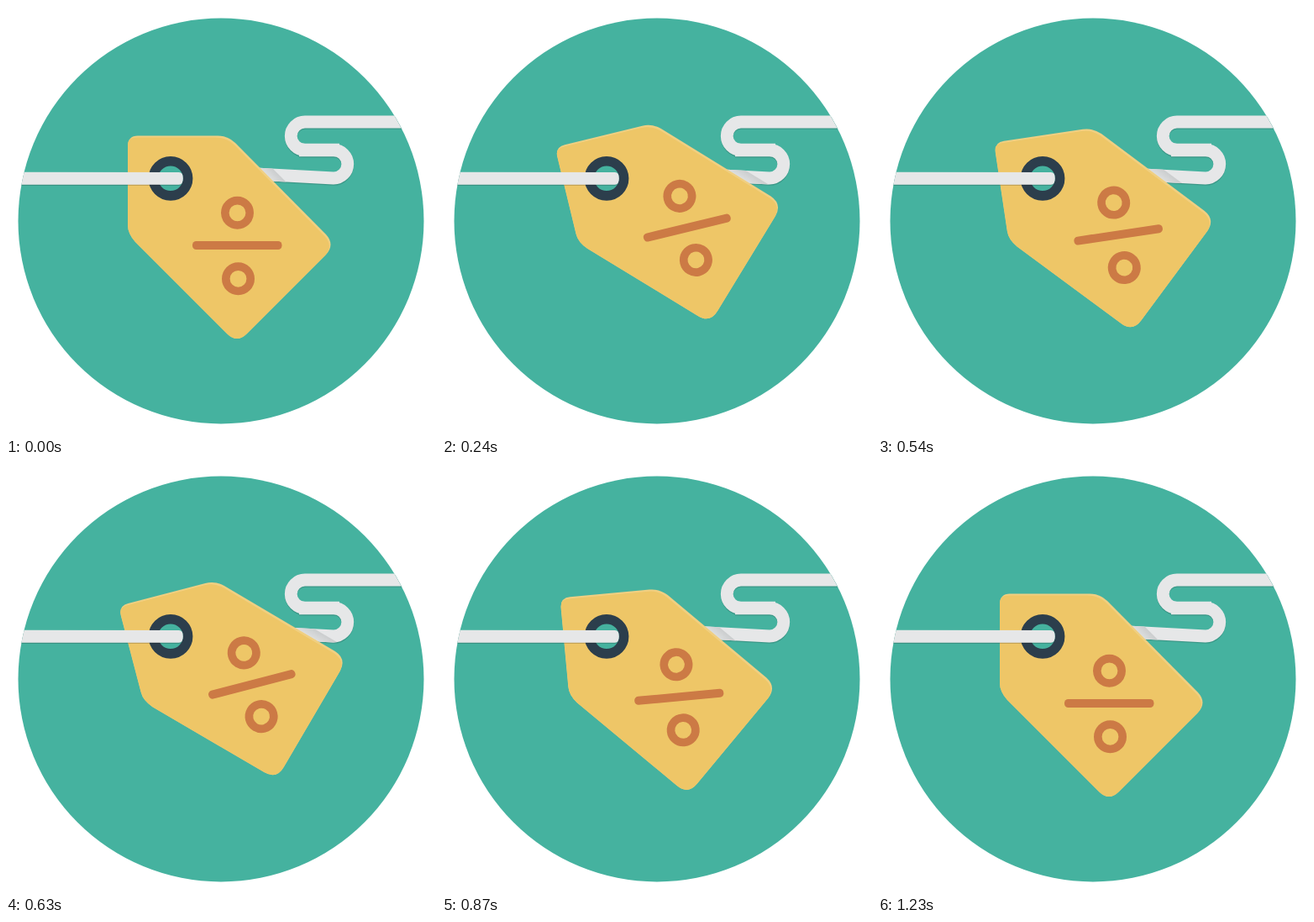
Write an HTML page that moves like this. It is 512 by 512 pixels and loops after 2.23 s.

```html
<!DOCTYPE html>
<html lang="en">
<head>
<meta charset="utf-8">
<title>Swinging price tag</title>
<style>
  html, body { margin: 0; width: 100%; height: 100%; overflow: hidden; background: #fff; }
  svg { display: block; width: 100%; height: 100%; }
</style>
</head>
<body>
<svg viewBox="0 0 512 512">
  <defs>
    <clipPath id="disc"><circle cx="256" cy="256" r="241.5"/></clipPath>
    <g id="cord" fill="none">
      <path stroke-width="14.8" d="M480 138H356a16.75 16.75 0 0 0 0 33.5H390a16.75 16.75 0 0 1 0 33.5L260 198"/>
      <path stroke-width="15.4" d="M349 171.5H397"/>
    </g>
    <mask id="onCord" maskUnits="userSpaceOnUse" x="0" y="0" width="512" height="512">
      <use href="#cord" stroke="#fff"/>
    </mask>
    <path id="tag" d="M145 167Q145 154.500 157 154.500H252Q264 154.500 273 163L381 272Q392 284 381 296L287 390Q275 402 263 390L154 281Q145 271 145 261Z"/>
    <clipPath id="inTag"><use href="#tag"/></clipPath>
    <linearGradient id="shade" gradientUnits="userSpaceOnUse" x1="303" y1="194" x2="310.500" y2="186.500">
      <stop offset="0" stop-color="#dcdedf"/>
      <stop offset="1" stop-color="#cbcdce"/>
    </linearGradient>
  </defs>

  <circle cx="256" cy="256" r="241.5" fill="#45b29f"/>
  <g clip-path="url(#disc)">
    <use href="#cord" stroke="#3b9888" y="1.3"/>
    <use href="#cord" stroke="#e6e7e8"/>
  </g>
  <g mask="url(#onCord)">
    <path class="swing" fill="url(#shade)" d="M263 154L278 154L396 272L381 272Z"/>
  </g>

  <g class="swing">
    <use href="#tag" fill="#f0cf81"/>
    <g clip-path="url(#inTag)"><use href="#tag" x="-1.6" y="2" fill="#eec667"/></g>
    <g fill="none" stroke="#cc7a45" stroke-width="9.6">
      <circle cx="275.5" cy="246.300" r="14.7"/>
      <circle cx="276.5" cy="324.800" r="14.7"/>
    </g>
    <rect x="222" y="280" width="106.500" height="10" rx="4.500" fill="#cc7a45"/>
  </g>

  <circle cx="196" cy="205.300" r="20.600" fill="#45b29f" stroke="#2c3e4c" stroke-width="11.600"/>
  <g clip-path="url(#disc)">
    <path fill="#000" fill-opacity=".18" d="M0 199H206Q210.500 199 210.500 206T206 214H0Z"/>
    <path fill="#e6e7e8" d="M0 197.700L206 198Q210.800 198 210.800 205.300T206 212.700H0Z"/>
  </g>
</svg>
<script>
const LOOP = 2230, STEP = 30, SWING = 1210;
// [share of the swing, angle in degrees]
const keys = [[0, 0], [.15, -15], [.45, -8.5], [.55, -15], [1, 0]];
const parts = document.querySelectorAll('.swing');

// cubic-bezier(.25, .1, .25, 1), solved by bisection
function ease(x) {
  let lo = 0, hi = 1, s = .5;
  for (let i = 0; i < 24; i++) {
    s = (lo + hi) / 2;
    if (.75 * s * (1 - s) + s ** 3 < x) lo = s; else hi = s;
  }
  return .3 * s * (1 - s) ** 2 + 3 * s * s * (1 - s) + s ** 3;
}

function angleAt(ms) {
  const p = ms / SWING;
  if (p >= 1) return 0;
  const i = keys.findIndex(k => k[0] > p);
  const [p0, a0] = keys[i - 1], [p1, a1] = keys[i];
  return a0 + (a1 - a0) * ease((p - p0) / (p1 - p0));
}

function draw(now) {
  const t = Math.floor((now % LOOP) / STEP) * STEP;
  const turn = `rotate(${angleAt(t)} 196 205.3)`;
  parts.forEach(el => el.setAttribute('transform', turn));
}

let start;
function tick(now) {
  start ??= now;
  draw(now - start);
  requestAnimationFrame(tick);
}
draw(0);
requestAnimationFrame(tick);
</script>
</body>
</html>
```
